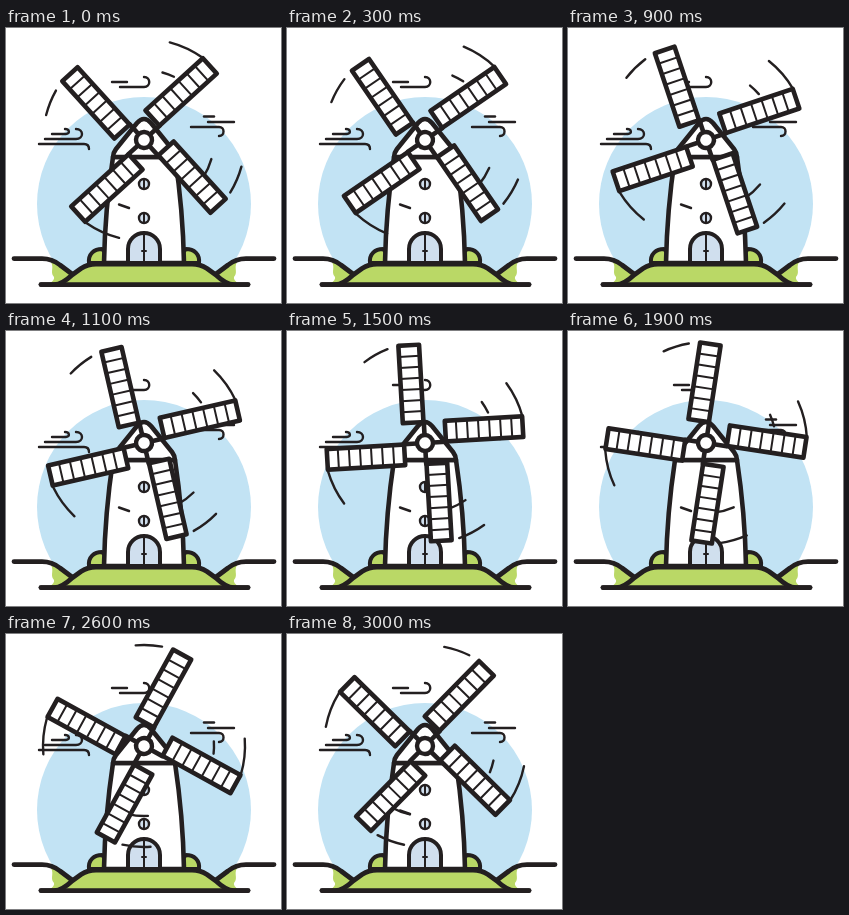
These frames come from a looping animation (275 px wide and 275 px high, 3100 ms). An HTML page with a canvas:

```html
<!DOCTYPE html>
<html lang="en">
<head>
<meta charset="utf-8">
<title>Windmill</title>
<style>
  html, body { margin: 0; width: 100%; height: 100%; overflow: hidden; background: #fff; }
  canvas { display: block; width: 275px; height: 275px; }
</style>
</head>
<body>
<canvas id="stage"></canvas>
<script>
const SIZE = 275, LOOP = 3100, STEP = 100;
const INK = '#231f20', SKY = '#c2e3f4', GRASS = '#bad866', GLASS = '#d0dfee', WHITE = '#fff';
const AXIS = 138, HUB_Y = 112;

// [time in ms, rotor angle in degrees]
const TURN = [[0, -42.2], [600, -26.7], [1100, -13], [1500, -3.3],
              [2200, 17.7], [2600, 28.8], [3000, 44.5], [3100, 47.8]];

// Swoosh arcs that travel with the rotor: [radius, start, end]
const SWOOSHES = [[101, 57.5, 73.5], [101, 146.5, 167], [101, 236.5, 251.5], [101, -33, -12],
                  [70, 58, 74.5], [70, -32.5, -22.5]];

const WINDS = [
  'M46 106H60C64 106 64 101 59 101',
  'M39 111H70C78 111 78 101 70 101',
  'M33 116H78Q83 116 83 121',
  'M106 54H121',
  'M114 59H138C145 59 145 49 138 49',
  'M198 88.5H208',
  'M202 94H228',
  'M185 99H213C219 99 219 108 213 108'
].map(d => new Path2D(d));

const BANK = new Path2D('M43 232Q52 234 66 246Q58 256 50 256H43Q49 252 48 249C43 244 50 238 43 232Z');
const BUSH = new Path2D('M83 235C82 226 88 221 96 221L110 235Z');
const SHORE = new Path2D('M8 230.6H36Q46 230.6 54 237L66 246');
const HILL = new Path2D('M35 256.6H48Q56 256.6 66 247L75 240.5Q82 236 90 236H186Q194 236 201 240.5L210 247Q220 256.6 228 256.6H242');
const LAND = new Path2D('M0 231H36Q46 231 54 237L66 246L80 236H196L210 246L222 237Q230 231 240 231H275V275H0Z');
const TOWER = new Path2D('M107 129Q99 182 98 235H178Q177 182 169 129Z');
const CAP = new Path2D('M107 129Q107 125 110 121L131 95Q138 87 145 95L166 121Q169 125 169 129Z');
const DOOR = new Path2D('M122 235V221A16 16 0 0 1 154 221V235Z');

const canvas = document.getElementById('stage');
const ctx = canvas.getContext('2d');
const ratio = window.devicePixelRatio || 1;
canvas.width = canvas.height = SIZE * ratio;

function fill(path, color) {
  ctx.fillStyle = color;
  ctx.fill(path);
}

function stroke(path, width) {
  ctx.lineWidth = width;
  ctx.stroke(path);
}

function line(x1, y1, x2, y2, width) {
  ctx.lineWidth = width;
  ctx.beginPath();
  ctx.moveTo(x1, y1);
  ctx.lineTo(x2, y2);
  ctx.stroke();
}

function disc(x, y, r, color, width) {
  ctx.beginPath();
  ctx.arc(x, y, r, 0, 2 * Math.PI);
  ctx.fillStyle = color;
  ctx.fill();
  if (width) {
    ctx.lineWidth = width;
    ctx.stroke();
  }
}

// Draws once as is and once mirrored about the tower's axis.
function bothSides(draw) {
  draw();
  ctx.save();
  ctx.translate(2 * AXIS, 0);
  ctx.scale(-1, 1);
  draw();
  ctx.restore();
}

function rotorAngle(t) {
  const i = TURN.findIndex(key => key[0] > t);
  const [t0, a0] = TURN[i - 1], [t1, a1] = TURN[i];
  return (a0 + (a1 - a0) * (t - t0) / (t1 - t0)) * Math.PI / 180;
}

function drawScenery() {
  disc(AXIS, 176, 107, SKY);
  fill(LAND, WHITE);
  WINDS.forEach(path => stroke(path, 2.4));
  bothSides(() => {
    fill(BUSH, GRASS);
    stroke(BUSH, 4);
    fill(BANK, GRASS);
    stroke(SHORE, 4.8);
  });
  fill(HILL, GRASS);
  stroke(HILL, 4.8);
  line(35, 256.6, 242, 256.6, 4.8);
}

function drawTower() {
  for (const part of [TOWER, CAP]) {
    fill(part, WHITE);
    stroke(part, 4.6);
  }
  for (const y of [156, 190]) {
    disc(AXIS, y, 5, GLASS, 2.4);
    line(AXIS, y - 5, AXIS, y + 5, 2);
  }
  line(113, 176.5, 123, 180, 2.4);
  fill(DOOR, GLASS);
  stroke(DOOR, 4);
  line(AXIS, 206, AXIS, 234, 2);
  line(136, 223, 140, 223, 2);
}

function drawBlade() {
  const left = -21, right = -0.3, top = -98.5, bottom = -21, cells = 7;
  line(0, 0, 0, bottom, 4.6);
  ctx.fillStyle = WHITE;
  ctx.fillRect(left, top, right - left, bottom - top);
  for (let i = 1; i < cells; i++) {
    const y = top + (bottom - top) * i / cells;
    line(left, y, right, y, 2);
  }
  ctx.lineWidth = 4.6;
  ctx.strokeRect(left, top, right - left, bottom - top);
}

function drawRotor(angle) {
  ctx.save();
  ctx.translate(AXIS, HUB_Y);
  ctx.rotate(angle);
  for (const [r, from, to] of SWOOSHES) {
    ctx.lineWidth = 2.4;
    ctx.beginPath();
    ctx.arc(0, 0, r, from * Math.PI / 180, to * Math.PI / 180);
    ctx.stroke();
  }
  for (let i = 0; i < 4; i++) {
    drawBlade();
    ctx.rotate(Math.PI / 2);
  }
  disc(0, 0, 8, WHITE, 4.4);
  ctx.restore();
}

function render(time) {
  const t = Math.floor((time % LOOP) / STEP) * STEP;
  ctx.setTransform(ratio, 0, 0, ratio, 0, 0);
  ctx.fillStyle = WHITE;
  ctx.fillRect(0, 0, SIZE, SIZE);
  ctx.strokeStyle = INK;
  ctx.lineCap = ctx.lineJoin = 'round';
  drawScenery();
  drawTower();
  drawRotor(rotorAngle(t));
}

const start = performance.now();
function tick() {
  render(performance.now() - start);
  requestAnimationFrame(tick);
}
tick();
</script>
</body>
</html>
```
